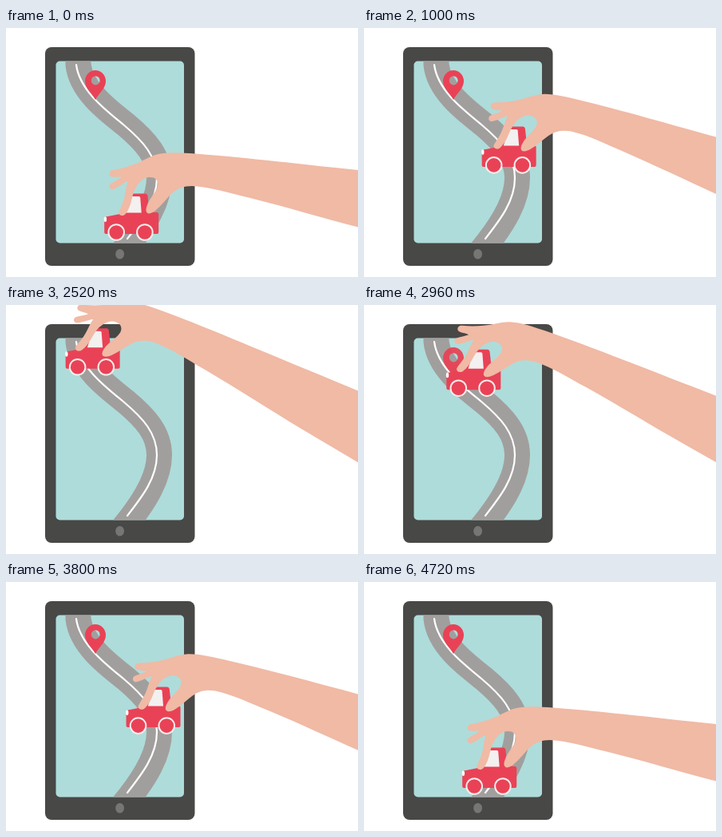
An HTML page for the animation above (4800 ms loop, 441 by 312 pixels).

```html
<!DOCTYPE html>
<html lang="en">
<head>
<meta charset="utf-8">
<title>Car on a tablet map</title>
<style>
  html, body { margin: 0; width: 100%; height: 100%; overflow: hidden; background: #fff; }
  svg { display: block; width: 100%; height: 100%; }
  .red { fill: #e94256; }
  .skin { fill: #f0baa5; }
  .wheel { fill: #e94256; stroke: #f6ecec; stroke-width: 2; }
  .road { fill: none; stroke: #a19f9d; stroke-width: 32; }
  .line { fill: none; stroke: #fff; stroke-width: 2.2; stroke-linecap: round; }
</style>
</head>
<body>
<svg viewBox="0 0 441 312">
  <defs>
    <clipPath id="screen"><rect x="62.5" y="41.5" width="160.5" height="228" rx="5"/></clipPath>
    <path id="route" d="M138.2 256 C152 236 169 220 168.5 196 C168 170 138 122 113 99 C103 90 91 79 80 69"/>
  </defs>
  <rect x="49" y="24" width="187.5" height="274" rx="8" fill="#484846"/>
  <ellipse cx="142.6" cy="283.3" rx="5.4" ry="6.3" fill="#767674"/>
  <g clip-path="url(#screen)">
    <rect x="62" y="41" width="162" height="230" fill="#aedcda"/>
    <path class="road" d="M90.500 30 V46 C94 78 127 103 150 121 C175 142 192 161 192 188
      C192 217 173 246 155 269 L136 293"/>
    <path class="line" d="M88 46 C92 78 125 103 147 121 C172 142 189 161 189 188 C189 217 170 241 152 264"/>
  </g>
  <path id="pin" class="red" fill-rule="evenodd" d="M112 90 C108 82 99 76 99 66.5 A13 13.5 0 0 1 125 66.5
    C125 76 116 82 112 90Z M106.8 65.8 a5.4 5.6 0 1 0 10.8 0 a5.4 5.6 0 1 0 -10.8 0Z"/>
  <g id="car">
    <path class="red" d="M-15 -17 Q-15 -19 -13 -19.5 Q-2 -21.5 9 -24 L15 -46.5 Q16 -48.5 18 -48.5
      H36.5 Q38.8 -48.5 39.2 -46 L41.5 -25 H50.5 Q53 -25 53 -22.5 V0 Q53 2 51 2 H-13 Q-15 2 -15 0Z"/>
    <path fill="#f3f0f0" d="M18.6 -45 H28.5 Q29.8 -45 30 -43.5 L31.5 -24.5 H12.2Z"/>
    <ellipse cx="-13.8" cy="-16.3" rx="1.7" ry="3.3" fill="#fff"/>
    <circle class="wheel" r="9.8"/>
    <circle class="wheel" cx="35.7" r="9.8"/>
  </g>
  <path id="arm" class="skin" d="M560 191 L441 178 C380 172 300 162 237 157.5 C222 156.5 204 155 191 158
    C180 160.5 171 167 160 171 C151 174.5 143 176.5 134 178 C128 179.500 128.500 186 133.500 186.500
    C138 187 141 186 145 187 C140 190.500 136 192 132 194.500 C127.500 197.500 130 203 134.500 202
    C142 199 147 194 153 191.500 C150 199 150 209 147 217 C145 223 142.500 227 141.500 231
    C141 236 148 236.500 150.500 232 C157 223 157 214 160 206 C163.5 196 171 187.500 179.500 187
    C187 186.500 191.500 191 190 198 C188 205 181.500 212 178 219 C176.500 223 174.500 227 176 230.500
    C178 234.500 184 231.500 188 228 C195 222 201 214 207 208 C214 201 223 198 233 198
    C256 199 282 207.500 304 212.500 C350 224 398 238.500 441 249.500 L560 280Z"/>
</svg>
<script>
  const STEP = 40, LOOP = 4800, TURN = 59;
  const [car, arm, pin, route] = ["car", "arm", "pin", "route"].map(id => document.getElementById(id));
  const length = route.getTotalLength();
  const home = route.getPointAtLength(0);

  // Slightly slower at both ends of the route
  const ease = u => u - 0.025 * Math.sin(2 * Math.PI * u);
  const tilt = u => 16.5 * Math.sin(Math.PI / 2 * u) ** 1.16;
  const clamp = v => Math.min(1, Math.max(0, v));

  function draw(now) {
    const n = Math.min(Math.floor(now % LOOP / STEP), 2 * TURN);
    const u = 1 - Math.abs(n / TURN - 1);
    const { x, y } = route.getPointAtLength(length * ease(u));
    car.setAttribute("transform", `translate(${x} ${y})`);
    arm.setAttribute("transform",
      `translate(${x - home.x} ${y - home.y}) rotate(${tilt(u)} 140 211)`);
    pin.setAttribute("opacity", clamp((0.88 - u) * 7));
  }

  const start = performance.now();
  function tick() {
    draw(performance.now() - start);
    requestAnimationFrame(tick);
  }
  tick();
</script>
</body>
</html>
```
